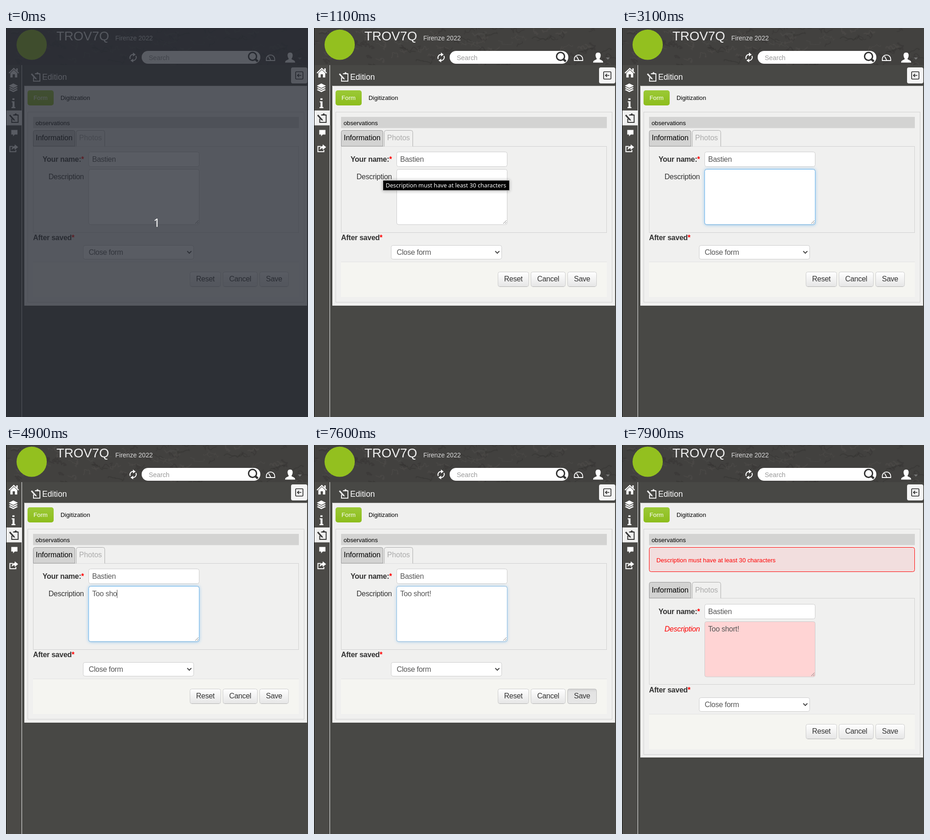
Recreate the animation shown at these times as an HTML page. Size 659x849 px, loop 8 s.

```html
<!DOCTYPE html>
<html lang="en">
<head>
<meta charset="utf-8">
<title>Edition form</title>
<style>
  html, body { margin: 0; width: 100%; height: 100%; overflow: hidden; background: #484845; }
  svg { display: block; width: 659px; height: 849px; }
  text { font-family: "Liberation Sans", Arial, sans-serif; font-size: 16px; letter-spacing: -.26px; fill: #333; }
  .small { font-size: 13.2px; letter-spacing: 0; }
  .tab, .title { letter-spacing: 0; }
  .bold { font-weight: bold; }
  .end { text-anchor: end; }
  .mid { text-anchor: middle; }
  .star { fill: #f00; }
  .value { fill: #555; }
  .ui { font-family: "Noto Sans", "Open Sans", sans-serif; letter-spacing: 0; fill: #fff; }
  .edge { fill: none; stroke: #d0d0d0; }
  .field { fill: #fff; stroke: #ccc; }
  .line { fill: none; stroke: #fff; stroke-width: 2; }
  .white { fill: #fff; }
</style>
</head>
<body>
<svg viewBox="0 0 659 849" xmlns="http://www.w3.org/2000/svg">
  <defs>
    <linearGradient id="green" x2="0" y2="1"><stop stop-color="#9bc936"/><stop offset="1" stop-color="#8dbd1c"/></linearGradient>
    <linearGradient id="grey" x2="0" y2="1"><stop stop-color="#fff"/><stop offset="1" stop-color="#e6e6e6"/></linearGradient>
    <linearGradient id="pressed" x2="0" y2="1"><stop stop-color="#d2d2d2"/><stop offset=".2" stop-color="#e3e3e3"/><stop offset="1" stop-color="#e6e6e6"/></linearGradient>
    <filter id="soft" x="-10%" y="-60%" width="120%" height="220%"><feGaussianBlur stdDeviation="3.5"/></filter>
    <clipPath id="top"><rect width="659" height="81"/></clipPath>
    <g id="clipboard" fill="none" stroke-width="2">
      <path d="M-2-7H9V9H-5V1"/>
      <path d="M-.5-6V-8.500H2L2.500-10.500H5L5.500-8.500H8V-6Z" fill="currentColor" stroke="none"/>
      <path d="M-9.500-7L-1.500 2" stroke-width="3.200"/>
      <path d="M-3 3.500L0 .5L2.500 5.500Z" fill="currentColor" stroke="none"/>
    </g>
  </defs>

  <rect width="659" height="849" fill="#484845"/>

  <!-- header -->
  <g clip-path="url(#top)">
    <rect width="659" height="81" fill="#42413f"/>
    <g id="relief" fill="none"></g>
  </g>
  <circle cx="56" cy="36.500" r="33" fill="#93c01f"/>
  <text class="title" x="110" y="27" style="font-size:28px;fill:#eee">TROV7Q</text>
  <text class="title" x="238.500" y="27" style="font-size:14px;fill:#d9d9d9">Firenze 2022</text>

  <g class="line" stroke-width="2.400">
    <path d="M271 67.500A7 7 0 0 1 278 57.800M283.500 61A7 7 0 0 1 276.500 71"/>
    <path class="white" stroke="none" d="M277 53.500L283 58L277 62ZM277.500 67L271.500 71L277.500 75Z"/>
  </g>
  <rect x="296" y="50" width="259" height="28" rx="14" fill="#fff"/>
  <text class="title" x="311.500" y="70" style="font-size:14.300px;fill:#999">Search</text>
  <g fill="none" stroke="#333">
    <circle cx="538" cy="62" r="8.700" stroke-width="3"/>
    <path d="M544 68L549.500 73" stroke-width="4.500"/>
  </g>
  <path class="line" style="stroke-width:1.800" d="M568 71V68A9.200 9.200 0 0 1 586.400 68V71ZM577.500 70L573 62"/>
  <path class="white" d="M620 53.500C624.500 53.500 626 57 625.500 61C625 64.500 623.500 66 623 67.500C624 70 631 69.500 631 75.500H609C609 69.500 616 70 617 67.500C616.500 66 615 64.500 614.500 61C614 57 615.500 53.500 620 53.500Z"/>
  <path d="M637 64.500H645.500L641.300 69Z" fill="#777"/>

  <!-- left dock -->
  <rect y="81" width="34" height="768" fill="#4b4a47"/>
  <rect x="34" y="81" width="1" height="768" fill="#f0f0f0"/>
  <rect y="180" width="34" height="32.500" fill="#f0f0ef"/>
  <g class="white">
    <path class="line" d="M6.500 98.500L17 88.500L27.500 98.500" style="stroke-width:2.400"/>
    <path d="M22.500 88H25.500V95L22.500 92ZM9.500 98.500L17 91.500L24.500 98.500V108H19.500V101H14.500V108H9.500Z"/>
    <path d="M16 121L26 126L16 131L6 126Z"/>
    <path d="M6 130.500L9 129L16 132.500L23 129L26 130.500L16 135.500ZM6 135L9 133.500L16 137L23 133.500L26 135L16 140Z"/>
    <path d="M14 153.500H18.500V157H14ZM12.500 160H18.500V172.500H20.500V175H12V172.500H14.300V162.300H12.500Z"/>
    <path d="M11.500 222.500H25V232.500H19L15.500 236.500V232.500H11.500Z"/>
    <path class="line" d="M15 258.500H8.500V270H21.500V266"/>
    <path d="M19 254L26.500 260L19 266V262.500C15.500 262.500 14 264 12.500 266C12.500 260.500 15 258 19 257.500Z"/>
  </g>
  <use href="#clipboard" x="17.500" y="197" stroke="#333" color="#333"/>

  <!-- panel title -->
  <use href="#clipboard" x="65" y="107" stroke="#eee" color="#eee"/>
  <text class="title" x="79" y="113" style="font-size:17.600px;fill:#fff">Edition</text>
  <rect x="622" y="86" width="35.500" height="35" rx="4" fill="#f5f5f5"/>
  <g fill="none" stroke="#222" stroke-width="1.600">
    <rect x="632" y="95.500" width="16" height="16" rx="1.500"/>
    <path d="M644.500 103.500H636M639.500 100L636 103.500L639.500 107"/>
  </g>
  <path d="M40 126.500H657" stroke="#f0f0ef" stroke-dasharray="2 1"/>

  <!-- panel -->
  <rect id="panel" x="40" y="127" width="617" fill="#f0f0ef"/>
  <rect x="47" y="136" width="57" height="33" rx="5" fill="url(#green)"/>
  <text class="small" x="60" y="157" style="fill:#fff">Form</text>
  <text class="small" x="119" y="157" style="fill:#000">Digitization</text>
  <rect id="frame" class="edge" x="47.500" y="183.500" width="603"/>
  <rect x="59" y="194" width="580" height="24.500" fill="#d3d3d2"/>
  <text class="small" x="64.500" y="212" style="fill:#000">observations</text>

  <g id="error">
    <rect x="59.500" y="223.500" width="579" height="53" rx="4" fill="#f2dede" stroke="#f00"/>
    <text class="small" x="75" y="256" style="fill:#f00">Description must have at least 30 characters</text>
  </g>

  <g id="tabs">
    <rect class="edge" x="59.500" y="258.500" width="579" height="188"/>
    <path d="M59.500 258V227.500Q59.500 223.500 63.500 223.500H146.500Q150.500 223.500 150.500 227.500V258Z" fill="#d3d3d2" stroke="#999"/>
    <path d="M153.500 258.500V227.500Q153.500 223.500 157.500 223.500H211.500Q215.500 223.500 215.500 227.500V258.500" fill="#f0f0ef" stroke="#aaa"/>
  </g>

  <g id="body">
    <text class="tab" x="65" y="245" style="fill:#000">Information</text>
    <text class="tab" x="159.500" y="245" style="fill:#aaa">Photos</text>

    <text class="bold end" x="170" y="292">Your name:<tspan class="star">*</tspan></text>
    <rect class="field" x="180.500" y="270.500" width="241" height="32" rx="4"/>
    <text class="value" x="188" y="292">Bastien</text>

    <text id="label" class="end" x="170" y="330">Description</text>
    <rect id="glow" x="180" y="308" width="242" height="122" rx="5" fill="#52a8ec" filter="url(#soft)"/>
    <rect id="area" class="field" x="180.500" y="308.500" width="241" height="120.500" rx="4"/>
    <rect id="ring" x="180.500" y="308.500" width="241" height="120.500" rx="4" fill="none" stroke="#6db6ee"/>
    <path d="M413 427L420 420M417 427L420 424" stroke="#777" fill="none"/>
    <text id="typed" class="value" x="188" y="330"></text>
    <rect id="caret" y="316" width="1" height="18" fill="#555"/>

    <text class="bold" x="59" y="463">After saved<tspan class="star">*</tspan></text>
    <rect class="field" x="168.500" y="474.500" width="241" height="30" rx="4"/>
    <text class="value" x="180.500" y="495">Close form</text>
    <path d="M395.500 487L400 491.500L404.500 487" fill="none" stroke="#444" stroke-width="2"/>

    <rect x="59" y="510" width="580" height="77" fill="#f5f5f1"/>
    <rect x="59" y="510" width="580" height="1" fill="#e2e2e2"/>
    <g id="buttons"></g>
  </g>

  <g id="tip">
    <rect x="150" y="332" width="277" height="24" fill="#000" opacity=".3" filter="url(#soft)"/>
    <rect x="150.500" y="332.500" width="276" height="22" fill="#000" stroke="#c4c4c4"/>
    <text class="ui" x="156.500" y="347.500" style="font-size:12.650px">Description must have at least 30 characters</text>
  </g>

  <rect width="1" height="849" fill="#111"/>

  <g id="veil">
    <rect width="659" height="849" fill="rgb(38,42,51)" opacity=".76"/>
    <text class="ui mid" x="329" y="434" style="font-size:25px">1</text>
  </g>
</svg>

<script>
const LOOP = 8000;
const MESSAGE = "Too short!";
const SHIFT = 77;
// [time, letters typed, caret x]
const KEYS = [
  [2500, 0, 189], [3500, 1, 197], [3700, 2, 205], [3800, 3, 213], [4000, 4, 218],
  [4500, 5, 225], [4600, 6, 233], [4900, 7, 242], [5100, 8, 247], [5200, 9, 251], [5400, 10, 255]
];

const el = id => document.getElementById(id);
const show = (id, on) => el(id).setAttribute("display", on ? "inline" : "none");
const set = (id, name, value) => el(id).setAttribute(name, value);
const moveY = (id, y) => set(id, "transform", `translate(0 ${y})`);

function drawButtons() {
  const items = [["Reset", 401, 68], ["Cancel", 473, 76], ["Save", 553, 64]];
  el("buttons").innerHTML = items.map(([name, x, w]) => `
    <rect id="${name}" x="${x + .5}" y="532.5" width="${w - 1}" height="32" rx="4" fill="url(#grey)" stroke="#ccc"/>
    <path d="M${x + 4} 564.5h${w - 8}" stroke="#b3b3b3"/>
    <text class="mid" x="${x + w / 2}" y="553">${name}</text>`).join("");
}

// faint map contours behind the header
function drawRelief() {
  let seed = 11;
  const rnd = () => (seed = seed * 16807 % 2147483647) / 2147483647;
  const span = (from, to) => (from + rnd() * (to - from)).toFixed(1);
  let out = "";
  for (let i = 0; i < 110; i++) {
    let d = `M${span(-10, 670)} ${span(0, 84)}`;
    for (let k = 0; k < 5; k++) d += `q${span(-3, 9)} ${span(-7, 7)} ${span(-4, 12)} ${span(-6, 6)}`;
    const tone = i % 2 ? "#555450" : "#302f2d";
    out += `<path d="${d}" stroke="${tone}" stroke-width="${span(1, 3)}" opacity=".35"/>`;
  }
  el("relief").innerHTML = out;
}

function focusLevel(t) {
  if (t < 2600 || t >= 7700) return 0;
  if (t < 2700) return .5;
  return t < 7600 ? 1 : .7;
}

function render(t) {
  const focus = focusLevel(t);
  const failed = t >= 7800;
  const down = t >= 7600 && !failed;
  const [keyTime, count, caretX] = KEYS.filter(k => k[0] <= t).pop() || KEYS[0];
  const blinkOn = Math.floor((t - keyTime) / 600) % 2 === 0;

  show("veil", t < 100);
  show("tip", t >= 1100 && t < 2200);
  set("glow", "opacity", focus * .6);
  set("ring", "opacity", focus);
  el("typed").textContent = MESSAGE.slice(0, count);
  set("caret", "x", caretX);
  show("caret", t >= 2600 && t < 7600 && blinkOn);

  set("Save", "fill", down ? "url(#pressed)" : "url(#grey)");
  set("Save", "stroke", down ? "#bbb" : "#ccc");

  show("error", failed);
  moveY("tabs", failed ? SHIFT - 1 : 0);
  moveY("body", failed ? SHIFT : 0);
  set("panel", "height", failed ? 555 : 479);
  set("frame", "height", failed ? 492 : 415);
  el("label").style.fill = failed ? "#f00" : "#333";
  el("label").style.fontStyle = failed ? "italic" : "normal";
  el("area").style.fill = failed ? "#ffd4d4" : "#fff";
}

drawButtons();
drawRelief();
const start = performance.now();
function tick() {
  render((performance.now() - start) % LOOP);
  requestAnimationFrame(tick);
}
tick();
</script>
</body>
</html>
```
